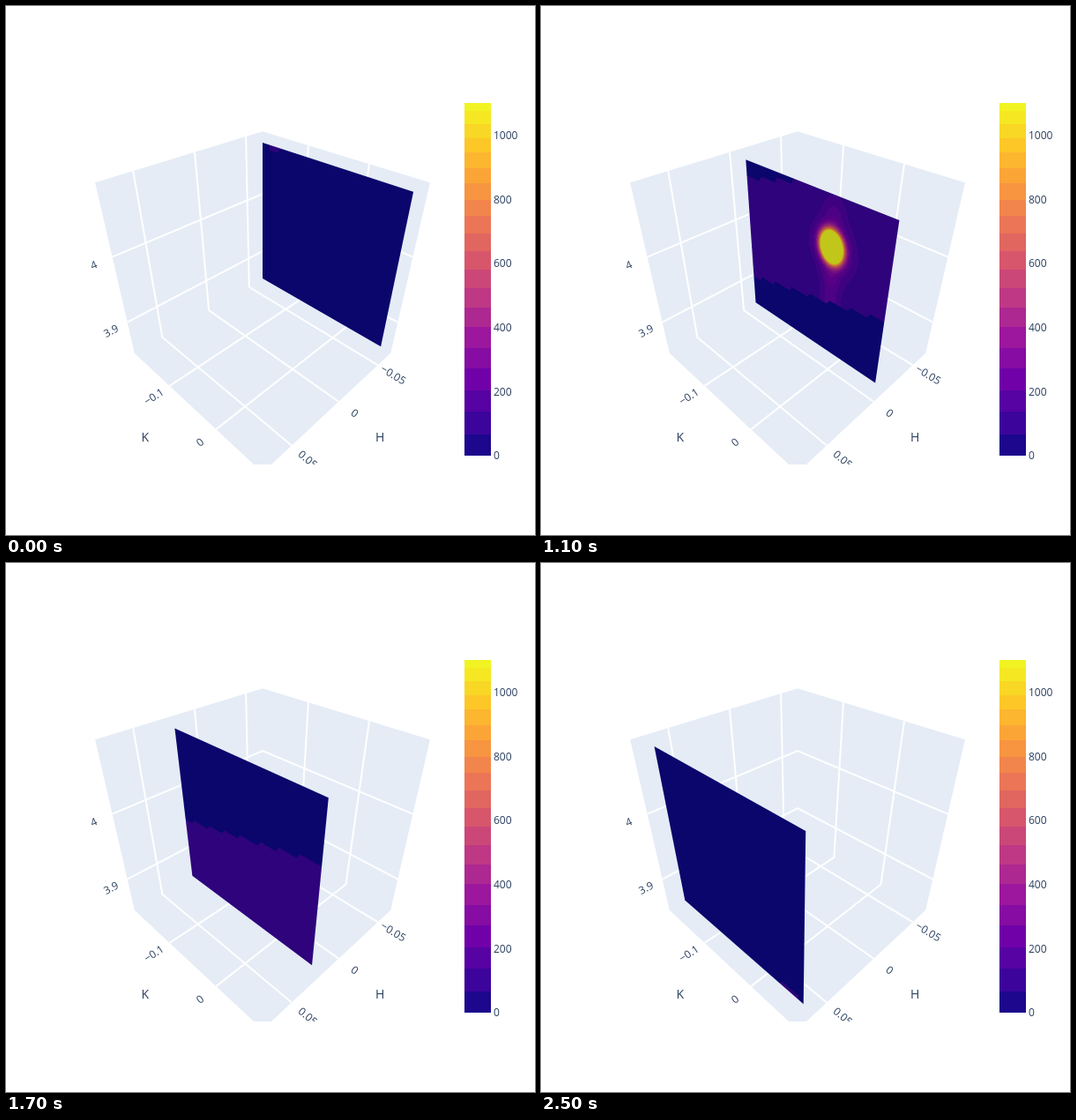
Write an HTML page with a canvas that moves like this. It is 600 by 600 pixels and loops after 2.6 s.

```html
<!DOCTYPE html>
<html>
<head>
<meta charset="utf-8">
<style>
html, body { margin: 0; width: 100%; height: 100%; overflow: hidden; background: #fff; }
canvas { display: block; }
</style>
</head>
<body>
<canvas id="stage" width="600" height="600"></canvas>
<script>
const ctx = document.getElementById('stage').getContext('2d');
const layer = document.createElement('canvas');
layer.width = layer.height = 600;
const layerCtx = layer.getContext('2d');

// Camera on the cube's diagonal, looking at its centre.
const CX = 291, CY = 310, FOCAL = 504, EYE = 1.25 * Math.sqrt(3);

function homogeneous(h, k, l) {
  const depth = EYE - (h + k + l) / Math.sqrt(3);
  const right = (k - h) / Math.sqrt(2), up = (2 * l - h - k) / Math.sqrt(6);
  return [CX * depth + FOCAL * right, CY * depth - FOCAL * up, depth];
}

function project(point) {
  const [x, y, w] = homogeneous(...point);
  return [x / w, y / w];
}

// Each axis: gridline over wall and floor; r is how far its free end reaches.
const AXES = [
  { ticks: { '−0.05': -0.374, '0': -0.0287, '0.05': 0.3166 },
    line: (t, r) => [[t, -0.5, 0.5], [t, -0.5, -0.5], [t, r, -0.5]] },
  { ticks: { '−0.1': -0.17, '0': 0.1966 },
    line: (t, r) => [[-0.5, t, 0.5], [-0.5, t, -0.5], [r, t, -0.5]] },
  { ticks: { '3.9': -0.2745, '4': 0.1287 },
    line: (t, r) => [[-0.5, 0.5, t], [-0.5, -0.5, t], [r, -0.5, t]] }
];

const SLICE = { back: -0.45, front: 0.423, left: -0.45, right: 0.459, bottom: -0.443, top: 0.461 };

const PLASMA = ['0d0887', '46039f', '7201a8', '9c179e', 'bd3786', 'd8576b', 'ed7953', 'fb9f3a', 'fdca26', 'f0f921']
  .map(hex => [0, 2, 4].map(i => parseInt(hex.substr(i, 2), 16)));

function plasma(f) {
  const p = Math.min(f * 9, 8.999), i = Math.floor(p);
  return PLASMA[i].map((c, k) => c + (PLASMA[i + 1][k] - c) * (p - i));
}

const bell = (x, sigma) => Math.exp(-x * x / (2 * sigma * sigma));

// Grid-stepped edge of the measured region.
function stepped(start, slope, u) {
  const level = x => Math.round((start - slope * x) * 32);
  const cell = u * 48, i = Math.floor(cell);
  const a = level(i / 48), b = level((i + 1) / 48);
  return (a + (b - a) * (cell - i)) / 32;
}

function intensity(u, v, n) {
  if (u < 0.06 - 0.008 * n || u > 1 - 0.004 * (n - 16)) return 0;
  if (v > stepped(0.265 + 0.0735 * (n - 3), 0.22, u)) return 0;
  if (v < stepped(0.257 + 0.077 * (n - 12), 0.235, u)) return 0;
  const du = u - 0.64, dv = v - 0.287;
  const peak = 4960 * bell(n - 8.7, 3) * bell(du, 0.041) * bell(dv, 0.051);
  const halo = 200 * bell(n - 9.5, 2.6) * bell(du - 0.01, 0.078) * bell(dv - 0.01, 0.092);
  const beads = bell(v - 0.1, 0.06) + bell(v - 0.48, 0.065) * 1.5 + bell(v - 0.64, 0.06) * 1.2;
  const rod = 80 * bell(n - 9.7, 2.9) * bell(u - 0.648, 0.045) * beads;
  return 95 + peak + halo + rod;
}

function path(points) {
  ctx.beginPath();
  for (const p of points) ctx.lineTo(...p);
}

function label(text, [x, y], angle = 0, size = 12, align = 'center') {
  ctx.save();
  ctx.translate(x, y);
  ctx.rotate(angle);
  ctx.font = size + 'px "Open Sans", sans-serif';
  ctx.textAlign = align;
  ctx.fillStyle = '#2a3f5f';
  ctx.fillText(text, 0, size * 0.37);
  ctx.restore();
}

function drawBox() {
  const walls = [[-1, -1, 1], [-1, 1, 1], [-1, 1, -1], [1, 1, -1], [1, -1, -1], [1, -1, 1]];
  path(walls.map(p => project(p.map(c => c / 2))));
  ctx.fillStyle = '#e5ecf6';
  ctx.fill();
  ctx.strokeStyle = '#fff';
  ctx.lineWidth = 2;
  for (const { ticks, line } of AXES) {
    for (const [text, t] of Object.entries(ticks)) {
      const points = line(t, 0.5).map(project);
      path(points);
      ctx.stroke();
      const end = points[2], spot = project(line(t, 0.595)[2]);
      label(text, spot, Math.atan((spot[1] - end[1]) / (spot[0] - end[0])));
    }
  }
  label('K', project([0.754, 0, -0.5]), 0, 14);
  label('H', project([0, 0.754, -0.5]), 0, 14);
}

function drawSlice(n) {
  const { back, front, left, right, top, bottom } = SLICE;
  const h = back + (front - back) * n / 24;
  const Q = homogeneous(h, left, top);
  const U = homogeneous(h, right, top).map((c, i) => c - Q[i]);
  const V = homogeneous(h, left, bottom).map((c, i) => c - Q[i]);
  const corners = [[left, top], [right, top], [right, bottom], [left, bottom]].map(([k, l]) => project([h, k, l]));
  const [x0, y0] = [0, 1].map(i => Math.floor(Math.min(...corners.map(p => p[i]))) - 1);
  const [x1, y1] = [0, 1].map(i => Math.ceil(Math.max(...corners.map(p => p[i]))) + 1);
  const img = layerCtx.createImageData(x1 - x0, y1 - y0);
  const clamp = t => Math.max(0, Math.min(1, t));

  let at = 0;
  for (let y = y0 + 0.5; y < y1; y++) {
    for (let x = x0 + 0.5; x < x1; x++) {
      // Invert the projection at this pixel.
      const a = U[0] - x * U[2], b = V[0] - x * V[2], e = x * Q[2] - Q[0];
      const c = U[1] - y * U[2], d = V[1] - y * V[2], f = y * Q[2] - Q[1];
      const det = a * d - b * c;
      const value = intensity(clamp((e * d - b * f) / det), clamp((a * f - e * c) / det), n);
      const level = Math.round(value / 47.5) * 47.5;
      for (const channel of plasma(level / 1100)) img.data[at++] = channel * 0.8;
      img.data[at++] = 255;
    }
  }
  layerCtx.clearRect(0, 0, 600, 600);
  layerCtx.putImageData(img, x0, y0);
  ctx.save();
  path(corners);
  ctx.clip();
  ctx.drawImage(layer, 0, 0);
  ctx.restore();
}

function drawColorbar() {
  // Bands grow taller towards the bottom.
  const edge = i => Math.max(110, Math.min(510, Math.round(104 + 14.4 * i + 0.3 * i * i)));
  for (let i = 0; i < 20; i++) {
    const top = edge(i), bottom = edge(i + 1);
    ctx.fillStyle = `rgb(${plasma((510 - (top + bottom) / 2) / 400).map(Math.round)})`;
    ctx.fillRect(520, top, 30, bottom - top);
  }
  for (let v = 0; v <= 1000; v += 200) label(v, [553, 510 - v / 2.75], 0, 12, 'left');
}

function draw(n) {
  ctx.fillStyle = '#fff';
  ctx.fillRect(0, 0, 600, 600);
  ctx.save();
  ctx.beginPath();
  ctx.rect(80, 80, 440, 440);
  ctx.clip();
  drawBox();
  drawSlice(n);
  ctx.restore();
  drawColorbar();
}

let shown = -1;
function tick() {
  const n = Math.max(0, Math.floor(performance.now() % 2600 / 100) - 1);
  if (n !== shown) draw(shown = n);
  requestAnimationFrame(tick);
}
tick();
</script>
</body>
</html>
```
